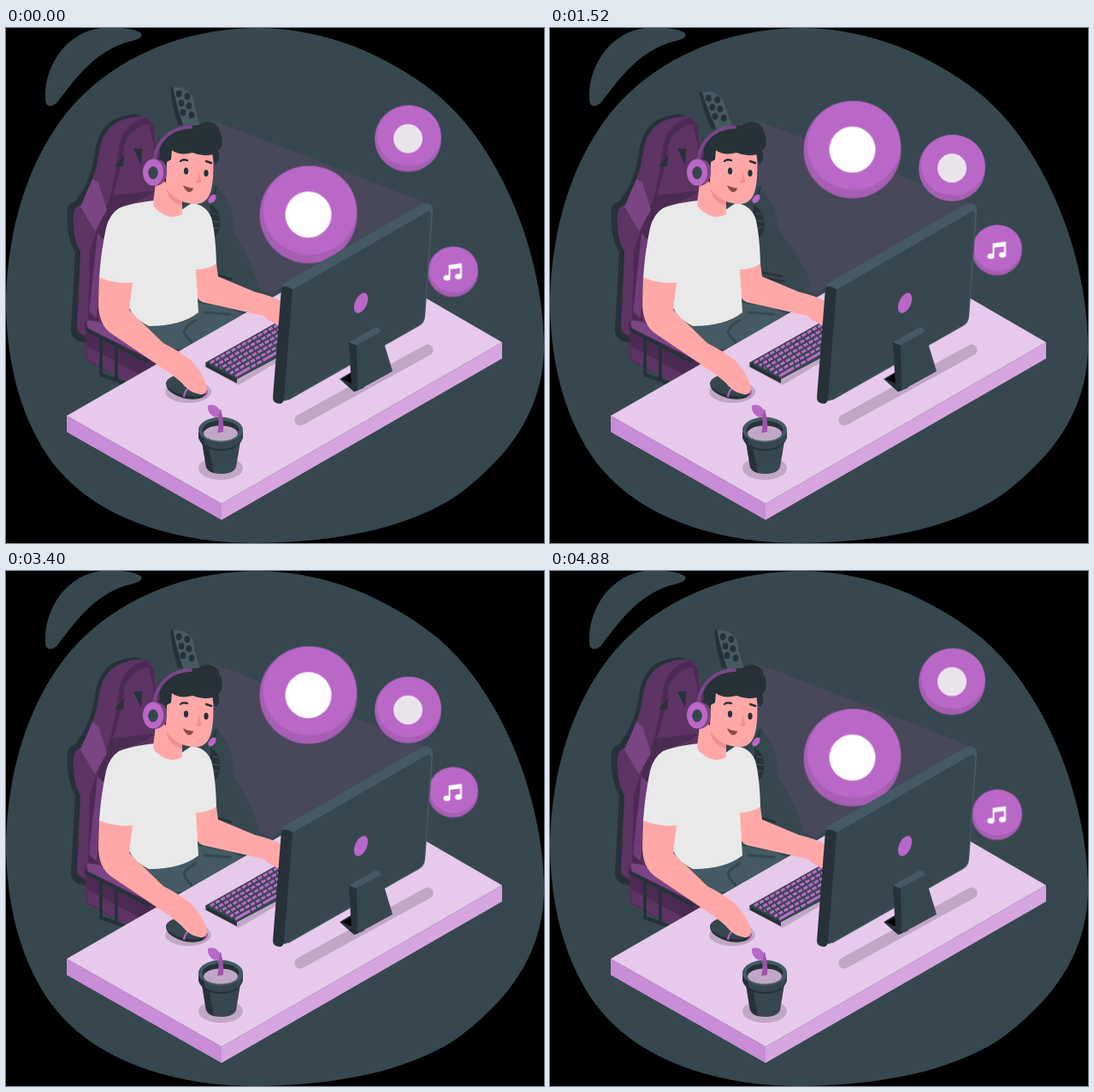
An HTML page that plays this animation: 629x603 px, repeating every 4920 ms.

```html
<!DOCTYPE html>
<html lang="en">
<head>
<meta charset="utf-8">
<title>Developer at a desk</title>
<style>
  html, body { margin: 0; width: 100%; height: 100%; overflow: hidden; background: #000; }
  svg { display: block; width: 629px; height: 603px; }
  #guitar { transform-origin: 240px 225px; }
  .bg { fill: #37474f; }
  .dark { fill: #263238; }
  .slate { fill: #455a64; }
  .purple { fill: #ba68c8; }
  .plum { fill: #5d3464; }
  .skin { fill: #ffa8a7; }
  .shade { fill: #c0a7c6; }
  .line { fill: none; stroke-linecap: round; stroke-linejoin: round; }
</style>
</head>
<body>
<svg viewBox="0 0 629 603">
  <!-- backdrop -->
  <g class="bg">
    <path d="M0 318C2 230 28 150 76 93C126 36 205 0 296 0C376 1 446 32 503 77C576 137 629 262 629 376C627 450 588 500 532 544C472 587 380 603 290 603C190 603 95 570 48 500C13 447 0 382 0 318Z"/>
    <path d="M46 84C44 44 71 5 111 0C129-1 150 0 158 6C161 12 152 14 140 17C103 29 82 58 60 87C53 94 46 92 46 84Z"/>
  </g>
  <path fill="#474859" d="M240 108L252 112L492 205L488 212L322 304L312 312L296 306L240 220Z"/>

  <g id="guitar">
    <path class="bg" d="M228 178L246 184Q263 205 265 220Q263 236 272 250Q287 272 297 308L240 320L225 240Z"/>
    <path class="dark" d="M239 207Q249 212 250 224Q251 238 245 244L239 246Z"/>
    <path class="line" stroke="#455a64" d="M242 217l6 2M241 226l8 1M241 235l7-1"/>
    <path class="line" stroke="#263238" stroke-width="2.5" d="M238 286l25 8M238 292l27 8"/>
    <path class="slate" d="M194 69L206 70Q217 75 219 83Q221 98 227 114L206 116Z"/>
    <path class="dark" d="M192 70L195 68Q198 85 207 114L201 113Q194 93 192 70Z"/>
    <g class="dark">
      <ellipse cx="202" cy="77" rx="3.4" ry="4"/><ellipse cx="212" cy="80" rx="3.4" ry="4"/>
      <ellipse cx="205" cy="88" rx="3.4" ry="4"/><ellipse cx="214" cy="91" rx="3.4" ry="4"/>
      <ellipse cx="207" cy="99" rx="3.4" ry="4"/><ellipse cx="217" cy="102" rx="3.4" ry="4"/>
    </g>
  </g>

  <!-- chair -->
  <path class="dark" d="M72 212Q73 206 82 202L92 186Q101 168 104 145Q108 118 125 108Q142 100 153 101L165 106L120 395L92 368Q76 366 76 354L81 262Q70 246 72 212Z"/>
  <path class="plum" d="M79 216Q81 209 89 206L97 186Q106 168 109 144Q113 119 131 110Q148 102 164 104Q170 107 173 116L190 205L150 372L100 362Q83 360 83 350L87 262Q77 245 79 216Z"/>
  <path fill="#4c2b53" d="M121 200Q130 162 132 139Q137 112 164 104L173 116L178 190L132 214L112 250L108 350L96 340L98 262L106 238Z"/>
  <path class="plum" d="M125 196Q136 160 138 138Q143 118 167 112L178 160L178 190Z"/>
  <path class="dark" d="M127 162L138 149L137 162ZM149 141L159 141L158 160Z"/>
  <path fill="#7c4586" d="M101 177L108 181L118 213L104 238L87 209Z"/>
  <path fill="#6f3d78" d="M107 240L114 248L106 340L97 332Z"/>
  <path fill="#4c2b53" d="M92 344L106 345L180 388L166 408L147 417L94 389Z"/>
  <path class="plum" d="M94 372L146 400L162 409L146 417L95 388Z"/>
  <path fill="#7c4586" d="M94 344Q100 341 110 345L180 384L174 390L96 352Z"/>
  <path class="line" stroke="#263238" stroke-width="4" d="M94 353L166 391M111 366L111 406L142 417M129 376L129 410"/>

  <!-- trousers -->
  <path class="slate" d="M160 346L226 322L262 328L282 338L212 376L188 376Z"/>
  <path class="line" stroke="#37474f" stroke-width="3" d="M222 342Q205 352 209 358L217 368M232 333L262 335"/>

  <!-- desk -->
  <path fill="#e6c9eb" d="M71 454L401 264L580 368L252 557Z"/>
  <path fill="#c98cd6" d="M71 454L252 557V576L71 473Z"/>
  <path fill="#d6a5df" d="M580 368V387L252 576V557Z"/>
  <path class="line" stroke="#c0a7c6" stroke-width="13" d="M344 459L493 377"/>

  <!-- keyboard -->
  <path class="shade" d="M231 396L330 345L345 375L272 418Z"/>
  <path class="dark" d="M233 392L325 340L362 362L270 411V416L234 397Z"/>
  <path class="bg" d="M233 392L325 340L362 362L270 411Z"/>
  <g id="keys" class="line" stroke="#ba68c8" stroke-width="3.2" style="stroke-linecap:butt"></g>

  <!-- mouse -->
  <ellipse class="shade" cx="213" cy="426" rx="27" ry="13"/>
  <path class="dark" d="M187 416Q189 409 202 406L236 425Q236 432 225 434Q210 437 195 428Q187 423 187 416Z"/>
  <path class="bg" d="M187 415Q190 408 202 406L235 424Q234 430 222 431Q207 432 194 424Q187 420 187 415Z"/>
  <path class="line" stroke="#ba68c8" stroke-width="2" d="M208 431Q209 425 214 421M231 432Q235 430 235 426"/>

  <!-- arms and shirt -->
  <path class="skin" d="M221 282L246 276L248 291L291 309Q309 313 322 320V349Q312 347 301 337L230 321Q222 318 222 308Z"/>
  <path class="skin" d="M109 290L149 296L144 330L184 369Q204 379 217 390Q231 405 235 421Q235 430 227 429Q214 427 205 415L193 405L122 357Q109 347 108 325Z"/>
  <path fill="#e9e9e9" d="M132 211Q145 205 174 202L205 213L217 205Q234 207 240 222Q245 240 246 276Q235 283 222 283L225 333Q205 349 167 349Q151 341 144 328L148 298Q128 300 109 292Q111 262 117 234Q121 218 132 211Z"/>

  <!-- head -->
  <path class="skin" d="M176 173L206 183V218Q192 226 178 214Q172 210 172 205Z"/>
  <path fill="#f28f8f" d="M187 187Q196 200 206 203V208Q190 204 187 187Z"/>
  <path class="skin" d="M184 145Q200 130 241 145Q244 164 241 184Q238 205 223 206Q207 206 197 198Q183 186 180 172Z"/>
  <path class="dark" d="M176 173Q176 158 180 149Q178 139 185 131Q191 121 204 120Q211 113 224 114Q233 108 242 111Q250 115 249 121Q254 126 252 133Q254 139 248 144Q252 152 246 159Q243 158 242 148Q231 151 218 146Q203 150 194 143L193 154L188 157L187 181Z"/>
  <path class="line" stroke="#263238" stroke-width="2.4" d="M204 156Q207 153 212 155M234 156L240 158"/>
  <ellipse class="dark" cx="210.5" cy="167.500" rx="2.6" ry="4"/>
  <ellipse class="dark" cx="234" cy="170" rx="2.6" ry="4"/>
  <path fill="#f28f8f" d="M224 166L229 180Q227 183 221 181Q226 178 224 166Z"/>
  <path fill="#8e4a4a" d="M207 184Q213 188 219 187Q218 193 213 192Q209 190 207 184Z"/>

  <!-- headset -->
  <path class="line" stroke="#7c4586" stroke-width="4" d="M173 156Q176 131 197 120Q207 116 216 116"/>
  <path class="line" stroke="#263238" stroke-width="1.5" d="M243 195L246 186"/>
  <path fill="#7c4586" d="M174 154Q188 153 188 169Q187 184 174 185Z"/>
  <ellipse class="purple" cx="172" cy="169" rx="12" ry="15.5"/>
  <ellipse class="bg" cx="172" cy="169.5" rx="5.8" ry="7.5"/>
  <ellipse class="purple" cx="241" cy="200" rx="3.5" ry="6" transform="rotate(38 241 200)"/>

  <!-- floating badges -->
  <g id="badges">
    <g data-r="57" data-x="353.5" data-y="218.5"><circle r="27" fill="#fff"/></g>
    <g data-r="39" data-x="470" data-y="129.5"><circle r="17" fill="#e9e4ea"/></g>
    <g data-r="29.5" data-x="522.5" data-y="285.5">
      <g fill="#fff">
        <ellipse cx="-7" cy="7" rx="4" ry="3.2"/><ellipse cx="6.5" cy="5.5" rx="4" ry="3.2"/>
        <path d="M-5-8L10.500-10V6H8.300V-4.500L-3-3V7H-5Z"/>
      </g>
    </g>
  </g>

  <!-- monitor -->
  <path class="slate" d="M322 304Q323 300 328 297L483 208Q492 203 497 207Q500 211 499 217L490 338Q489 346 483 349L330 436L324 360Z"/>
  <path class="bg" d="M334 307L491 216Q497 213 497 220L489 337Q488 345 482 348L328 436Q323 438 323 433Z"/>
  <path class="dark" d="M322 304Q326 300 335 306L325 434Q325 438 321 440Q312 440 312 433Z"/>
  <ellipse class="purple" cx="415" cy="322" rx="7" ry="12.5" transform="rotate(24 415 322)"/>
  <path class="dark" d="M390 411L405 402L419 421L407 426Z"/>
  <path d="M393 411L405 404V417Z"/>
  <path class="slate" d="M401 368L431 351Q436 350 438 355L439 361L410 376Z"/>
  <path class="bg" d="M408 372L438 356L452 402L410 425Z"/>
  <path class="dark" d="M401 368L410 372L411 425L404 421Z"/>

  <!-- plant pot -->
  <ellipse class="shade" cx="251" cy="515.5" rx="26" ry="13.5"/>
  <path class="bg" d="M229 484L234 514Q237 522 251 522Q266 522 269 514L274 484Z"/>
  <path class="dark" d="M229 484L234 514Q236 519 243 521L237 490Z"/>
  <path class="dark" d="M225 470V480Q231 495 251 495Q271 495 277 480V470Z"/>
  <path class="bg" d="M232 480V487Q240 493 251 493Q271 493 277 479V470Z"/>
  <ellipse class="slate" cx="251" cy="470.5" rx="26" ry="15"/>
  <ellipse class="dark" cx="251" cy="471" rx="21.5" ry="11.5"/>
  <ellipse class="shade" cx="251" cy="474.5" rx="20" ry="9"/>
  <path fill="#9c55a8" d="M247 474Q250 461 247 451L251 446Q255 460 254 473Z"/>
  <path class="purple" d="M236 442Q246 439 250 448Q250 455 245 456Q235 452 236 442Z"/>
</svg>
<script>
const LOOP = 4920, HALF = 2440;
const byId = id => document.getElementById(id);

function add(parent, tag, attrs) {
  const el = document.createElementNS('http://www.w3.org/2000/svg', tag);
  for (const k in attrs) el.setAttribute(k, attrs[k]);
  parent.prepend(el);
}

// steps: [time, transform]
function play(el, steps) {
  el.animate(steps.map(([t, transform]) => ({
    offset: t / LOOP, transform, easing: 'ease-in-out'
  })), { duration: LOOP, iterations: Infinity });
}

for (let i = 0; i < 6; i++) {
  add(byId('keys'), 'path', {
    d: `M${239 + i * 5.8} ${392 + i * 3.1}l88-49.7`,
    'stroke-dasharray': i === 5 ? '6 1.8 22 1.8 6 1.8' : '5.3 1.8',
    'stroke-dashoffset': i * 2
  });
}

const moves = [
  [[0, 0], [HALF, -108], [2 * HALF, 0], [LOOP, 0]],
  [[0, 0], [HALF, 49], [2 * HALF, 0], [LOOP, 0]],
  [[0, 0], [HALF / 2, -29], [HALF, 0], [HALF * 1.5, -29], [2 * HALF, 0], [LOOP, 0]]
];
[...byId('badges').children].forEach((g, i) => {
  const { r, x, y } = g.dataset;
  add(g, 'ellipse', { rx: r * .96, ry: r * .91, cx: r * .03, cy: -r * .09, fill: '#ba68c8' });
  add(g, 'circle', { r, fill: '#a75eb4' });
  play(g, moves[i].map(([t, dy]) => [t, `translate(${x}px, ${+y + dy}px)`]));
});

play(byId('guitar'), [[0, 0], [1220, -6.5], [1740, -6.5], [2960, 0], [LOOP, 0]]
  .map(([t, a]) => [t, `rotate(${a}deg)`]));
</script>
</body>
</html>
```
